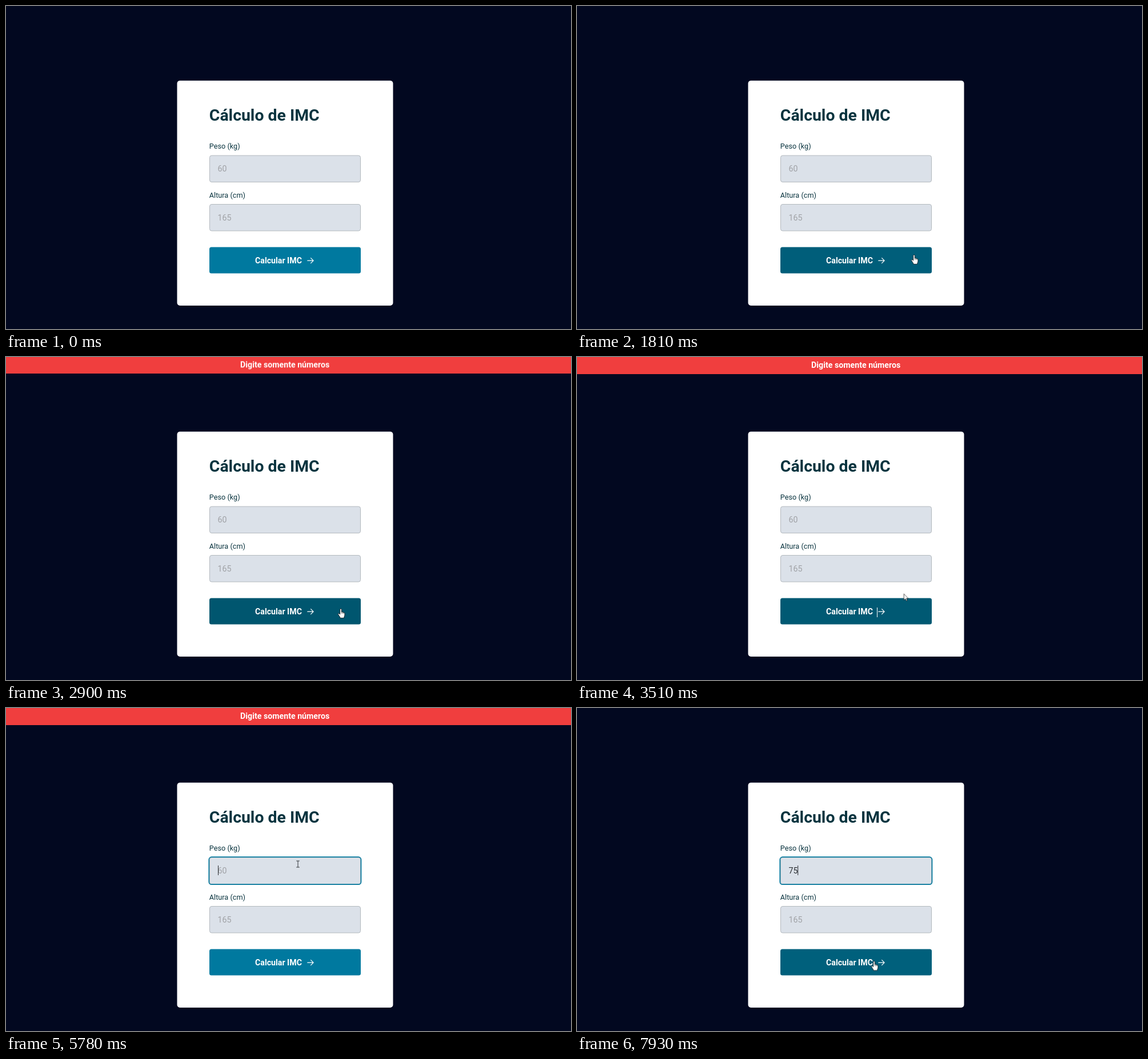
An HTML page for the animation above (8000 ms loop, 989 px wide and 566 px high).

```html
<!DOCTYPE html>
<html lang="pt-BR">
<head>
<meta charset="utf-8">
<title>Cálculo de IMC</title>
<style>
  html, body { margin: 0; width: 100%; height: 100%; overflow: hidden; background: #020820; }
  svg { display: block; width: 100%; height: 100%; font-family: Roboto, Arial, sans-serif; }

  .title { font-size: 28.4px; font-weight: 700; fill: #0a343f; }
  .label { font-size: 12.7px; fill: #0a343f; }
  .value { font-size: 14.2px; fill: #2c2f33; }
  .hint { fill: #a0a2a6; }
  .strong { font-size: 14.2px; font-weight: 700; fill: #fff; text-anchor: middle; }
  .field { fill: #dbe1e9; stroke: #b3b9be; }
  .ring { fill: none; stroke: #03789d; stroke-width: 1.7; }
  .icon { fill: none; stroke: #fff; stroke-width: 1.2; stroke-linecap: round; stroke-linejoin: round; }

  /* One loop lasts 8 s, so 1% is 80 ms */
  .anim { animation: 8s step-end infinite; }

  #button { animation: button 8s ease infinite; }
  @keyframes button {
    0%, 21.25% { fill: #00799f; }
    24.25%, 43.6% { fill: #00566f; }
    46.6%, 97.9% { fill: #00799f; }
    100% { fill: #005c77; }
  }

  #alert { animation: alert 8s linear infinite; }
  @keyframes alert {
    0% { transform: translateY(-31px); }
    30.625% { transform: translateY(-30px); animation-timing-function: ease; }
    37.5% { transform: translateY(0); }
    76.375% { transform: translateY(0); animation-timing-function: step-end; }
    76.376%, 100% { transform: translateY(-31px); }
  }

  #buttonCaret { animation-name: buttonCaret; }
  @keyframes buttonCaret {
    0%, 35.125%, 48.375%, 59.875%, 100% { opacity: 0; }
    28.5%, 41.75%, 55% { opacity: 1; }
  }

  #ring { animation-name: ring; }
  @keyframes ring { 0% { opacity: 0; } 59.875%, 100% { opacity: 1; } }

  #hint { animation-name: hint; }
  @keyframes hint { 0% { opacity: 1; } 76.375%, 100% { opacity: 0; } }

  #seven { animation-name: seven; }
  @keyframes seven { 0% { opacity: 0; } 76.375%, 100% { opacity: 1; } }

  #five { animation-name: five; }
  @keyframes five { 0% { opacity: 0; } 81.375%, 100% { opacity: 1; } }

  #caret { animation-name: caret; }
  @keyframes caret {
    0% { opacity: 0; transform: none; }
    59.875% { opacity: 1; transform: none; }
    66.5% { opacity: 0; transform: none; }
    72.25% { opacity: 1; transform: none; }
    76.375% { opacity: 1; transform: translateX(7.5px); }
    81.375% { opacity: 1; transform: translateX(15.2px); }
    88% { opacity: 0; transform: translateX(15.2px); }
    94.625%, 100% { opacity: 1; transform: translateX(15.2px); }
  }

  #pointer { animation: move 8s linear infinite; }
  @keyframes move {
    0%, 6.25% { transform: translate(775px, 532px); }
    8% { transform: translate(738px, 492px); }
    9.75% { transform: translate(708px, 450px); }
    11.5%, 15.625% { transform: translate(694px, 418px); }
    17.375% { transform: translate(682px, 411px); }
    19.125% { transform: translate(655px, 411px); }
    20.875% { transform: translate(622px, 418px); }
    21.75% { transform: translate(604px, 430px); }
    22.625%, 23.4% { transform: translate(590px, 436px); }
    25%, 28.49% { transform: translate(589px, 430px); }
    28.5%, 41.25% { transform: translate(586px, 441px); }
    42.125% { transform: translate(583px, 438px); }
    43.875% { transform: translate(572px, 415px); }
    45.625% { transform: translate(552px, 350px); }
    47.375% { transform: translate(530px, 272px); }
    48.25% { transform: translate(522px, 250px); }
    49% { transform: translate(516px, 252px); }
    49.875%, 50.7% { transform: translate(512.5px, 270px); }
    51.625%, 62.36% { transform: translate(513px, 269px); }
    62.375%, 92.5% { transform: translate(511px, 273.5px); }
    93.875% { transform: translate(510px, 290px); }
    95.625% { transform: translate(511px, 340px); }
    97.375% { transform: translate(516px, 405px); }
    98.25% { transform: translate(519px, 430px); }
    99.125%, 100% { transform: translate(520px, 443.5px); }
  }

  /* Pointer shape follows whatever lies below it */
  #arrow { animation-name: arrow; }
  @keyframes arrow {
    0%, 21.25%, 44.45%, 47.8%, 95.8%, 98%, 100% { opacity: 0; }
    6.25%, 43.6%, 45.7%, 49.4%, 94.55%, 97.1% { opacity: 1; }
    46.55%, 49.45% { opacity: 0; }
    47.81% { opacity: 1; }
  }
  #hand { animation-name: hand; }
  @keyframes hand {
    0%, 43.6% { opacity: 0; }
    21.25%, 98%, 100% { opacity: 1; }
  }
  #beam { animation-name: beam; }
  @keyframes beam {
    0%, 45.7%, 47.81%, 94.55%, 97.1%, 100% { opacity: 0; }
    44.45%, 46.55%, 49.45%, 95.8% { opacity: 1; }
  }
</style>
</head>
<body>
<svg viewBox="0 0 989 566">
  <rect width="989" height="566" fill="#020820"/>
  <rect x="299.5" y="130.7" width="378" height="394.3" rx="5" fill="#fff"/>
  <text class="title" x="355.8" y="201">Cálculo de IMC</text>

  <text class="label" x="355.8" y="250">Peso (kg)</text>
  <rect class="field" x="356.5" y="262" width="264" height="46.5" rx="3.5"/>
  <rect id="ring" class="ring anim" x="355.3" y="261.2" width="266.2" height="48" rx="4.5"/>
  <text id="hint" class="value hint anim" x="370.5" y="290">60</text>
  <text id="seven" class="value anim" x="370.5" y="290">7</text>
  <text id="five" class="value anim" x="378.5" y="290">5</text>
  <rect id="caret" class="anim" x="371" y="276" width="1" height="17" fill="#2c2f33"/>

  <text class="label" x="355.8" y="336">Altura (cm)</text>
  <rect class="field" x="356.5" y="347.5" width="264" height="46.5" rx="3.5"/>
  <text class="value hint" x="370.5" y="375.5">165</text>

  <rect id="button" x="356" y="422.4" width="265" height="46" rx="3.5"/>
  <text class="strong" x="477" y="450.5">Calcular IMC</text>
  <path class="icon" d="M527.8 446.2H538M533.6 441.7l4.5 4.5-4.5 4.5"/>
  <rect id="buttonCaret" class="anim" x="525" y="439" width="1" height="17" fill="#fff"/>

  <g id="alert">
    <rect y="-1" width="989" height="31" fill="#f03e3e"/>
    <text class="strong" x="488.2" y="19.2">Digite somente números</text>
  </g>

  <g id="pointer">
    <path id="arrow" class="anim" d="M.3.5V11.5L2.9 9.1 4.5 12.8 6.2 12.1 4.6 8.5H8Z"
      fill="#fff" stroke="#111" stroke-width=".7"/>
    <g id="hand" class="anim" stroke="#0b1114" stroke-width=".8" stroke-linejoin="round">
      <path fill="#fff" d="M-1.3 1.3Q-1.2 0 0 0T1.3 1.3V5.6L3 5.8Q3.8 6 4 6.5L5.2 6.8Q6.9 7.2 6.9 8.8V11Q6.8 13 5.8 14.6V16.3H-1.2V14.9Q-3.6 12-4.6 9.5-4.6 7.6-2.8 8.7L-1.3 10Z"/>
      <path fill="none" stroke-width=".5" d="M1.3 5.6V8.6M3 6V8.8M4.8 6.8V9"/>
    </g>
    <path id="beam" class="anim" d="M-2.8-5.5H2.8M0-5.5V5.5M-2.8 5.5H2.8" fill="none" stroke="#33363a"/>
  </g>
</svg>
</body>
</html>
```
